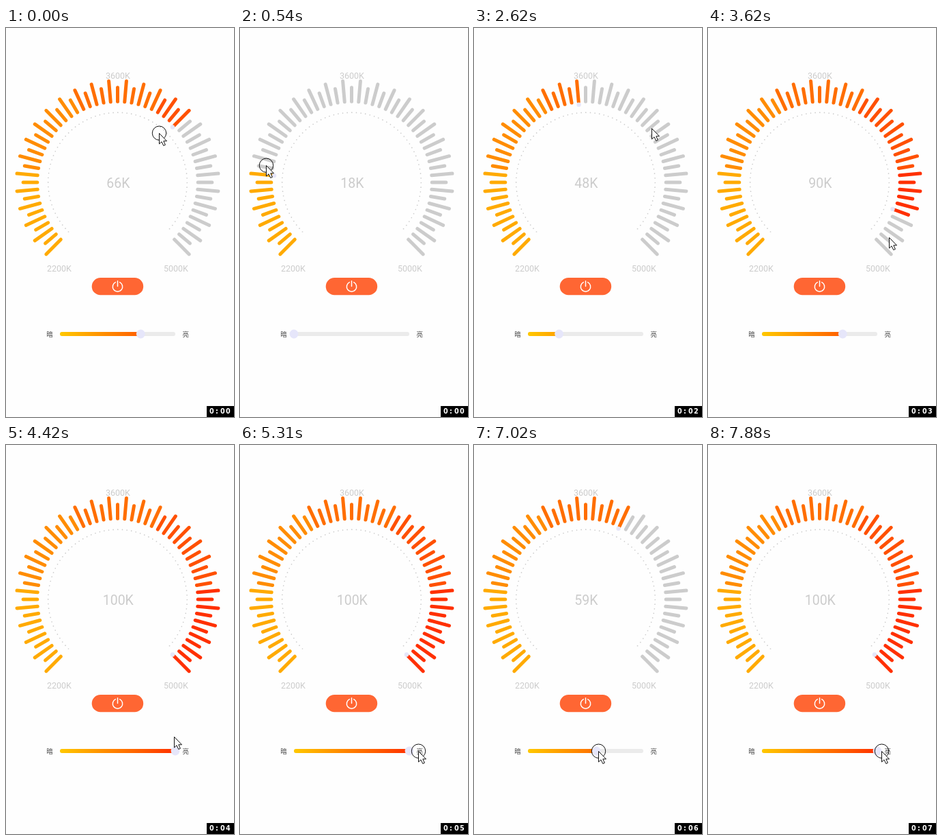
An HTML page for the animation above (8000 ms loop, 334 by 567 pixels).

```html
<!DOCTYPE html>
<html lang="zh">
<head>
<meta charset="utf-8">
<title>Colour temperature dial</title>
<style>
  html, body { margin: 0; width: 100%; height: 100%; overflow: hidden; background: #fefefe; }
  svg { display: block; width: 334px; height: 567px; }
  text { font-family: Roboto, "Open Sans", sans-serif; text-anchor: middle; fill: #ccc; }
  .scale { font-size: 12.5px; }
  .value { font-size: 19.5px; }
  .end { font: 9.5px "Noto Sans CJK SC", "Noto Sans CJK", sans-serif; fill: #444; }
  .clock { font: bold 9.6px "DejaVu Sans", sans-serif; fill: #fff; text-anchor: start; }
</style>
</head>
<body>
<svg viewBox="0 0 334 567">
  <defs>
    <linearGradient id="warm" gradientUnits="userSpaceOnUse" x1="79" y1="0" x2="248" y2="0">
      <stop offset="0" stop-color="#ffc800"/>
      <stop offset="1" stop-color="#ff3000"/>
    </linearGradient>
  </defs>

  <text class="scale" x="164" y="74">3600K</text>
  <text class="scale" x="78" y="355">2200K</text>
  <text class="scale" x="249" y="355">5000K</text>
  <text class="value" id="value" x="164.3" y="232.5"></text>

  <path id="dots" fill="none" stroke="#ccc" stroke-width="1.7" stroke-linecap="round"/>
  <g id="ticks" stroke-width="5" stroke-linecap="round"></g>
  <circle id="knob" r="3.2" fill="#e6e6fa"/>

  <rect x="125.7" y="364" width="75.5" height="25.3" rx="12.65" fill="#ff6633"/>
  <g fill="none" stroke="#fff" stroke-width="1.5" stroke-linecap="round">
    <path d="M160.3 370.6A7.2 7.2 0 1 0 166.7 370.6"/>
    <path d="M163.5 368.8V376.6"/>
  </g>

  <text class="end" x="64" y="450">暗</text>
  <text class="end" x="263.3" y="450">亮</text>
  <rect x="79" y="443" width="169" height="6" rx="3" fill="#ebebeb"/>
  <rect id="fill" x="79" y="443" height="6" rx="3" fill="url(#warm)"/>
  <circle id="handle" cy="446" r="6.4" fill="#e6e6fa"/>

  <g id="cursor" stroke="#111">
    <circle id="ring" cx=".5" cy=".2" r="10.2" fill="none"/>
    <path d="M.5 .5V16L4 12.8 6.8 18.5 9.4 17.3 6.8 11.8H11.5Z" fill="#fff"/>
  </g>

  <rect x="294" y="551" width="40" height="16"/>
  <text class="clock" id="clock" x="298 307 314 322" y="562"></text>
</svg>
<script>
const LOOP = 8000, STEP = 130, LAST = 54, CX = 163.5, CY = 225;
const COLORS = ['#ffaa00', '#ff8c00', '#ff6e00', '#ff5000', '#ff3000'];
const SLIDER_DRAG = 5590;

// time, x, y of the pointer until it drags the slider
const PATH = [
  [0, 224, 153], [260, 114, 120], [520, 38, 200], [910, 66, 322], [1170, 33, 261],
  [1430, 33, 261], [2080, 93, 137], [2340, 156, 109], [2470, 256, 127], [2600, 260, 146],
  [3120, 294, 215], [3510, 265, 305], [3900, 263, 308], [4290, 259, 392], [4550, 234, 445],
  [4940, 234, 445], [5200, 261, 446]
];
// time, dial position in ticks (may run past the end)
const DIAL = [
  [0, 36], [910, 0], [1430, 0], [1950, 15], [2210, 15], [2340, 26], [2600, 26],
  [2860, 38], [3380, 49], [3640, 49], [3900, 56], [SLIDER_DRAG, 56], [6240, 5],
  [6370, 5], [6500, 3], [6760, 5], [7150, 44], [7670, 54]
];
const PRESSED = [[0, 1040], [1400, 2080], [3770, 4030], [4940, LOOP]];

const $ = id => document.getElementById(id);
const set = (el, attrs) => { for (const k in attrs) el.setAttribute(k, attrs[k]); };

function polar(i, r) {
  const a = (135 + i * 5) * Math.PI / 180;
  return [CX + r * Math.cos(a), CY + r * Math.sin(a)];
}

// smooth curve through column c of the keys, never overshooting them
function sample(keys, c, t) {
  const end = keys.length - 1;
  if (t >= keys[end][0]) return keys[end][c];
  const n = keys.findIndex(k => k[0] > t) - 1;
  const slope = k => (keys[k + 1][c] - keys[k][c]) / (keys[k + 1][0] - keys[k][0]);
  const tangent = k => {
    if (k === 0) return slope(0);
    if (k === end) return 0;
    const a = slope(k - 1), b = slope(k);
    return a * b > 0 ? 2 * a * b / (a + b) : 0;
  };
  const span = keys[n + 1][0] - keys[n][0], p = (t - keys[n][0]) / span, q = 1 - p;
  return keys[n][c] * q * q * (1 + 2 * p) + keys[n + 1][c] * p * p * (3 - 2 * p)
    + span * p * q * (tangent(n) * q - tangent(n + 1) * p);
}

const ticks = Array.from({ length: LAST + 1 }, (_, i) => {
  const line = document.createElementNS('http://www.w3.org/2000/svg', 'line');
  const [x1, y1] = polar(i, 117.7), [x2, y2] = polar(i, i % 2 ? 138.3 : 148);
  set(line, { x1, y1, x2, y2 });
  return $('ticks').appendChild(line);
});

const R = 101.8, arc = R * Math.PI * 1.5;
set($('dots'), {
  d: `M${polar(0, R)}A${R} ${R} 0 1 1 ${polar(LAST, R)}`,
  'stroke-dasharray': `0 ${arc / 72}`
});

// turning the dial moves the slider in coarse steps; dragging the slider is direct
function sliderLevel(i, t) {
  if (t >= SLIDER_DRAG || i === LAST) return i / LAST;
  return i < 17 ? 0 : i < 36 ? 0.27 : 0.7;
}

function draw(t) {
  const turn = sample(DIAL, 1, t), i = Math.min(LAST, Math.round(turn));
  ticks.forEach((tick, n) => set(tick, { stroke: n <= i ? COLORS[Math.floor(n / 11)] : '#ccc' }));
  const [cx, cy] = polar(i, 113.8);
  set($('knob'), { cx, cy });
  $('value').textContent = Math.floor(i / LAST * 100) + 'K';

  const width = 169 * sliderLevel(i, t);
  set($('fill'), { width });
  set($('handle'), { cx: 79 + width });

  const [x, y] = t < SLIDER_DRAG
    ? [sample(PATH, 1, t), sample(PATH, 2, t)]
    : [74.4 + 3.326 * turn, 446];
  set($('cursor'), { transform: `translate(${Math.round(x)} ${Math.round(y)})` });
  const down = PRESSED.some(([from, to]) => t >= from && t < to);
  set($('ring'), { visibility: down ? 'visible' : 'hidden' });
  $('clock').textContent = '0:0' + Math.floor((t + 25) / 1040);
}

const start = performance.now();
let shown = -1;
function frame() {
  const now = (performance.now() - start) % LOOP;
  const t = Math.floor(now / STEP) * STEP;
  if (t !== shown) draw(shown = t);
  requestAnimationFrame(frame);
}
frame();
</script>
</body>
</html>
```
